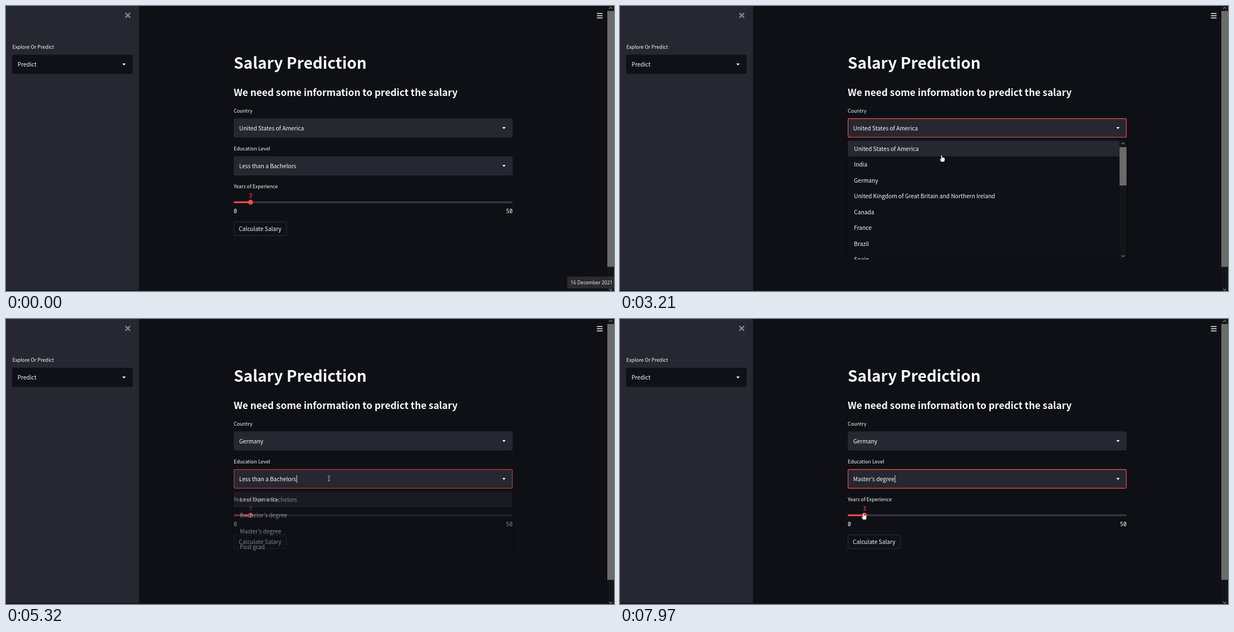
An HTML page that plays this animation: 1092x513 px, repeating every 8 s.

```html
<!DOCTYPE html>
<html lang="en">
<head>
<meta charset="utf-8">
<title>Salary Prediction</title>
<style>
  html, body { margin: 0; width: 100%; height: 100%; overflow: hidden; background: #0f1015; }
  svg { display: block; }
  text { font: 10.2px "Noto Sans CJK JP", "Noto Sans CJK SC", "Noto Sans", sans-serif; fill: #fafafa; white-space: pre; }
  .label { font-size: 8.9px; }
  .title { font-size: 28.1px; font-weight: 700; }
  .subtitle { font-size: 17.25px; font-weight: 600; }
  .mono { font-family: "Noto Sans Mono", "DejaVu Sans Mono", monospace; font-size: 10px; }
  .date { font-family: "Open Sans", "Noto Sans", sans-serif; font-size: 8.6px; }
  .end { text-anchor: end; }
  .middle { text-anchor: middle; }
</style>
</head>
<body>
<svg id="stage" width="1092" height="513" viewBox="0 0 1092 513"></svg>
<script>
const LOOP = 8000, ROW = 28.5;
const RED = '#ff4b4b', PANEL = '#262730', DARK = '#0e1117', GREY = '#6b6b6b', TRACK = '#141519';
const stage = document.getElementById('stage');

function add(parent, tag, attrs, content) {
  const node = document.createElementNS('http://www.w3.org/2000/svg', tag);
  for (const key in attrs) node.setAttribute(key, attrs[key]);
  if (content !== undefined) node.textContent = content;
  return parent.appendChild(node);
}
const group = (parent = stage) => add(parent, 'g', {});
const rect = (parent, x, y, width, height, fill, rx = 0) => add(parent, 'rect', { x, y, width, height, fill, rx });
const path = (parent, d, attrs) => add(parent, 'path', { d, fill: 'none', ...attrs });
const text = (parent, x, y, content, cls = '') => add(parent, 'text', { x, y, class: cls }, content);
const set = (node, key, value) => node.setAttribute(key, value);
const show = (node, opacity) => set(node, 'opacity', +opacity);

function selectBox(x, y, width, fill, value) {
  const g = group();
  rect(g, x, y, width, 34.5, fill, 3);
  const border = add(g, 'rect', { x: x + .6, y: y + .4, width: width - 1.2, height: 33.7, rx: 2.4, fill: 'none', stroke: RED, 'stroke-width': 1.1 });
  const label = text(g, x + 9.8, y + 21.4, value);
  const caret = rect(g, 0, y + 10.5, .9, 14, '#fafafa');
  path(g, `M${x + width - 18.7} ${y + 15.8}h6.2l-3.1 3.4z`, { fill: '#fafafa' });
  return { border, label, caret };
}

function menu(y, height, rowWidth, options) {
  const g = group();
  rect(g, 406, y - 2, 507, height + 5, '#0b0d13', 4);
  rect(g, 409, y - 4, 500.5, height + 6, DARK, 3);
  const clipId = 'clip' + y;
  rect(add(g, 'clipPath', { id: clipId }), 409, y, 501, height);
  const list = add(g, 'g', { 'clip-path': `url(#${clipId})` });
  const highlight = rect(list, 409, y, rowWidth, ROW, PANEL);
  options.forEach((name, i) => text(list, 420.3, y + i * ROW + 18.3, name));
  return { g, highlight, y };
}

// Page
rect(stage, 0, 0, 239, 513, PANEL);
rect(stage, 0, 511.5, 1092, 1.5, '#111218');
path(stage, 'M215.2 13.4l7 7m0-7l-7 7', { stroke: '#83848a', 'stroke-width': 2.5, 'stroke-linecap': 'round' });
path(stage, 'M1061.3 13.5h10.2m-10.2 4h10.2m-10.2 4h10.2', { stroke: '#f2f2f2', 'stroke-width': 1.4 });
rect(stage, 1080, 0, 12, 513, TRACK);
rect(stage, 1080, 9, 12, 460.5, GREY);
path(stage, 'M1083.2 5l2.8-2.8 2.8 2.8M1083.2 509l2.8 2.8 2.8-2.8', { stroke: '#8a8a8a', 'stroke-width': 1.1 });

text(stage, 11.5, 77.3, 'Explore Or Predict', 'label');
const mode = selectBox(11, 87.8, 216.5, DARK, 'Predict');
show(mode.border, 0);
show(mode.caret, 0);

text(stage, 409, 113, 'Salary Prediction', 'title');
text(stage, 409, 161.7, 'We need some information to predict the salary', 'subtitle');
text(stage, 409, 191.8, 'Country', 'label');
const country = selectBox(409, 202.2, 501, PANEL, 'United States of America');
text(stage, 409, 260, 'Education Level', 'label');
const education = selectBox(409, 270.5, 501, PANEL, 'Less than a Bachelors');

text(stage, 409, 328.3, 'Years of Experience', 'label');
rect(stage, 409, 351.8, 501, 2.9, '#393b45', 1.4);
rect(stage, 409, 351.8, 30, 2.9, RED, 1.4);
add(stage, 'circle', { cx: 439.2, cy: 353.2, r: 4.4, fill: RED });
set(text(stage, 439.2, 345.4, '3', 'mono middle'), 'style', 'fill:' + RED);
text(stage, 409, 373, '0', 'mono');
text(stage, 910, 373, '50', 'mono end');
add(stage, 'rect', { x: 409.4, y: 388.5, width: 94.3, height: 24.6, rx: 2.6, fill: DARK, stroke: '#363a44', 'stroke-width': .8 });
text(stage, 418, 405.4, 'Calculate Salary');

// Menus
const countryMenu = menu(242.3, 214, 488, ['United States of America', 'India', 'Germany',
  'United Kingdom of Great Britain and Northern Ireland', 'Canada', 'France', 'Brazil', 'Spain']);
rect(countryMenu.g, 897.3, 242, 12.4, 214, TRACK);
rect(countryMenu.g, 897.3, 254, 12.4, 69, GREY);
path(countryMenu.g, 'M900.7 248.8l2.8-2.8 2.8 2.8M900.7 448.6l2.8 2.8 2.8-2.8', { stroke: '#85868a', 'stroke-width': 1.1 });
const educationMenu = menu(310.4, 115, 500.5, ['Less than a Bachelors', 'Bachelor’s degree', 'Master’s degree', 'Post grad']);

// Date tooltip
const tooltip = group();
rect(tooltip, 1008, 487, 84, 21.5, '#2b2b2e', 2);
text(tooltip, 1014, 500.6, '16 December 2021', 'date');

// Pointer, drawn around its hot spot
const pointer = group();
const click = add(pointer, 'circle', { r: 8.6, fill: '#fff000', 'fill-opacity': .55 });
const shapes = {
  arrow: path(pointer, 'M0 0V9.3L2.2 7.4 3.7 10.8 5.2 10.1 3.8 6.8H6.6Z', { fill: '#fff', stroke: '#111', 'stroke-width': .5 }),
  beam: path(pointer, 'M-2.2 -4.3H-.5L0 -3.8 .5 -4.3H2.2M0 -3.8V3.8M-2.2 4.3H-.5L0 3.8 .5 4.3H2.2', { stroke: '#c8c8ca', 'stroke-width': .9 }),
  hand: path(pointer, 'M-1 .8Q0 -.6 1 .8V4.2L2.7 4.4 4.4 4.9 5.9 5.6V8.8L4.8 12.2H-.7L-3.4 7.8Q-3.3 6.4 -1.9 7.2L-1 8.2Z',
    { fill: '#fff', stroke: '#111', 'stroke-width': .5 })
};

// Moves: start, end, steps, then the place reached
const start = [902, 494];
const moves = [
  [850, 1620, 12, 571.5, 225.5],
  [2940, 3210, 5, 577.5, 268.3],
  [3280, 3680, 6, 571.5, 317.5],
  [4370, 4910, 9, 580, 287],
  [5730, 6410, 10, 548.5, 382],
  [7230, 7970, 11, 437, 349]
];
const clicks = [2290, 3880, 5180, 6610];

const between = (t, from, to) => t >= from && t < to;
// Stepped progress: first step at `from`, complete at `to`
const stepped = (t, from, to, steps) =>
  t < from ? 0 : Math.min(1, (Math.floor((t - from) / (to - from) * (steps - 1) + 1e-6) + 1) / steps);

function pointerAt(t) {
  let [x, y] = start;
  for (const [from, to, steps, nextX, nextY] of moves) {
    const p = stepped(t, from, to, steps), ease = p * p * (3 - 2 * p);
    x += (nextX - x) * ease;
    y += (nextY - y) * ease;
  }
  return [x, y];
}

function pointerShape(t, x, y, menuOpen) {
  if (between(t, 3880, 4370) || between(t, 6610, 7230)) return 'arrow';
  if (menuOpen && y > menuOpen.y) return 'hand';
  if (x > 409 && x < 885 && (between(y, 202, 237) || between(y, 270, 305))) return 'beam';
  if (x > 409 && x < 910 && between(y, 347, 359)) return 'hand';
  return 'arrow';
}

function updateSelect(box, value, focus, caretOn) {
  if (box.label.textContent !== value) box.label.textContent = value;
  show(box.border, focus);
  show(box.caret, caretOn);
  if (caretOn) set(box.caret, 'x', 419.4 + box.label.getComputedTextLength());
}

function draw(t) {
  const [x, y] = pointerAt(t);
  const countryOpen = t < 4220 ? stepped(t, 2480, 2620, 3) : 0;
  const educationOpen = t < 6950 ? stepped(t, 5250, 5460, 4) : 0;
  const menuOpen = countryOpen ? countryMenu : educationOpen ? educationMenu : null;

  updateSelect(country, t < 4220 ? 'United States of America' : 'Germany',
    t < 5250 ? stepped(t, 2480, 2620, 3) : 0, between(t, 2550, 3080) || between(t, 4220, 4640));
  updateSelect(education, t < 6950 ? 'Less than a Bachelors' : 'Master’s degree',
    stepped(t, 5250, 5390, 3), between(t, 5250, 6000) || between(t, 6950, 7300) || t >= 7600);

  show(countryMenu.g, countryOpen);
  show(educationMenu.g, educationOpen);
  if (menuOpen) set(menuOpen.highlight, 'y', menuOpen.y + Math.max(0, Math.floor((y - menuOpen.y) / ROW)) * ROW);

  show(tooltip, 1 - stepped(t, 380, 520, 3));
  show(pointer, t >= 380);
  set(pointer, 'transform', `translate(${x.toFixed(2)} ${y.toFixed(2)})`);
  const shape = pointerShape(t, x, y, menuOpen);
  for (const name in shapes) show(shapes[name], name === shape);
  show(click, clicks.some(c => between(t, c, c + 130)));
}

function frame(now) {
  draw(now % LOOP);
  requestAnimationFrame(frame);
}
draw(0);
requestAnimationFrame(frame);
</script>
</body>
</html>
```
